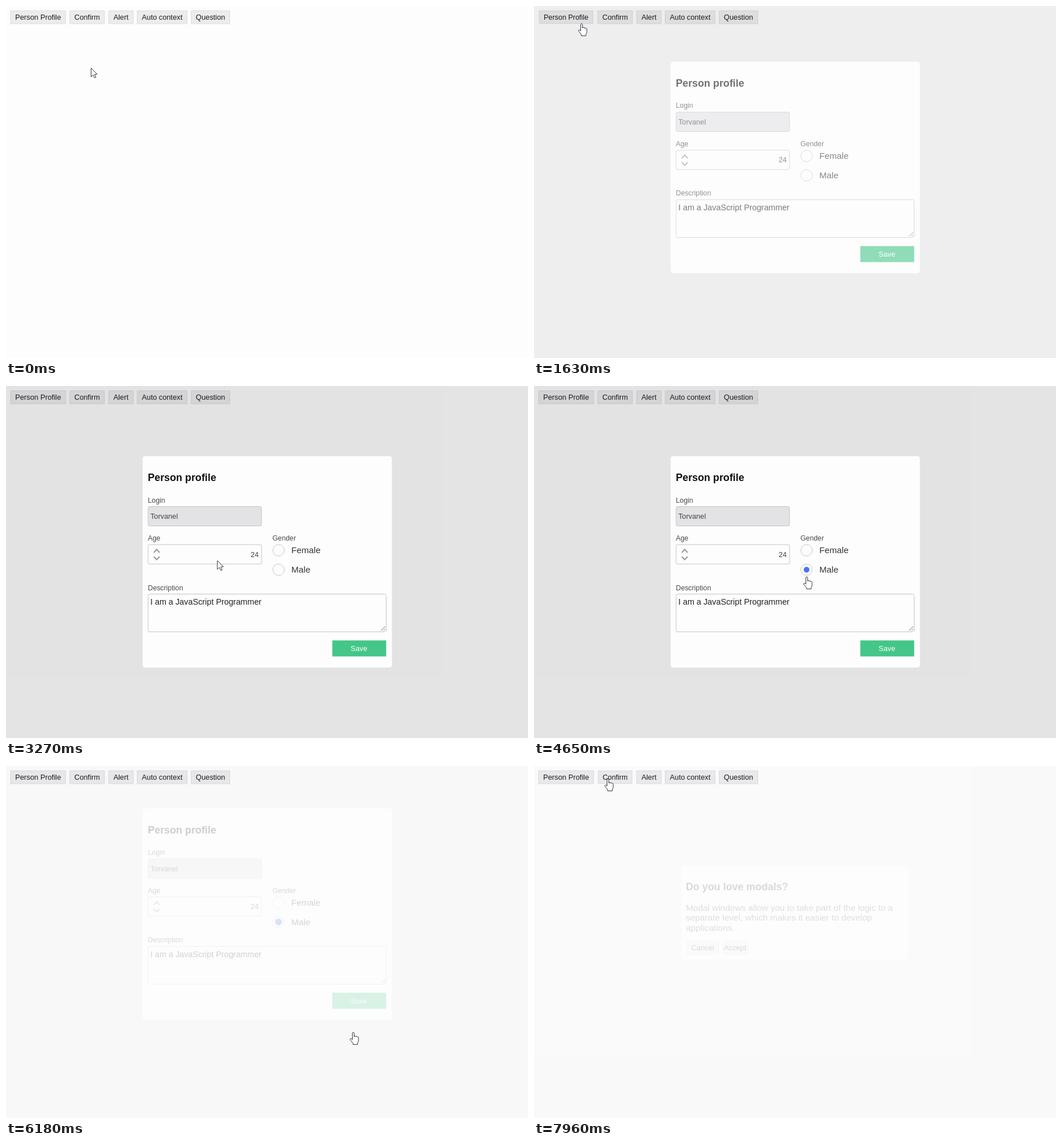
Write an HTML page that moves like this. It is 911 px wide and 615 px high and loops after 7.99 s.

```html
<!DOCTYPE html>
<html lang="en">
<head>
<meta charset="utf-8">
<title>Modal windows</title>
<style>
  html, body { margin: 0; width: 100%; height: 100%; overflow: hidden; background: #fdfdfd; }
  svg { display: block; width: 911px; height: 615px; font-family: "Liberation Sans", Arial, sans-serif; cursor: default; }
  .btn { transform-box: fill-box; transform-origin: center; }
  .btn rect { fill: #ececef; stroke: #dcdce1; }
  .btn text { font-size: 12.75px; text-anchor: middle; fill: #1c1c1c; }
  #save rect { fill: #44c689; stroke: none; }
  #save text { fill: #fff; }
  .shade { fill: #000; fill-opacity: .1; }
  .card { fill: #fdfdfd; }
  .title { font-size: 17.75px; font-weight: bold; fill: #111; }
  .label { font-size: 12.3px; fill: #484848; }
  .value { font-size: 12.7px; fill: #444; }
  .big { font-size: 15.3px; fill: #333; }
  .field { fill: #fdfdfd; stroke: #c4c4cb; }
  .off { fill: #e3e3e6; }
  .ring { fill: #fdfdfd; stroke: #c6c6d2; }
  .dot { fill: #4a74f0; }
  .line { fill: none; stroke: #999; stroke-width: 2; }
  .cursor { fill: #fff; stroke: #33333c; stroke-linejoin: round; }
</style>
</head>
<body>
<svg viewBox="0 0 911 615">
  <g id="bar"></g>

  <g id="profile">
    <rect class="shade" width="911" height="615"/>
    <g class="panel">
      <rect class="card" x="238.5" y="122.5" width="435" height="369.5" rx="4.5"/>
      <text class="title" x="247.5" y="166">Person profile</text>
      <text class="label" x="247.5" y="203.5">Login</text>
      <rect class="field off" x="248" y="210.5" width="198" height="34" rx="3"/>
      <text class="value" x="252" y="232">Torvanel</text>
      <text class="label" x="247.5" y="270">Age</text>
      <rect class="field" x="248" y="277" width="198" height="34" rx="3"/>
      <path class="line" d="M258 291l5-5.5 5 5.5M258 298l5 5.5 5-5.5"/>
      <text class="value" x="441" y="298.5" text-anchor="end">24</text>
      <text class="label" x="465" y="270">Gender</text>
      <circle class="ring" cx="475.7" cy="287" r="10"/>
      <circle class="ring" cx="475.7" cy="321" r="10"/>
      <circle class="dot" id="female" cx="475.7" cy="287" r="5"/>
      <circle class="dot" id="male" cx="475.7" cy="321" r="5"/>
      <text class="big" x="498" y="292">Female</text>
      <text class="big" x="498" y="326">Male</text>
      <text class="label" x="247.5" y="356.5">Description</text>
      <rect class="field" x="248" y="363.5" width="415.5" height="66" rx="3"/>
      <text x="252" y="382" font-size="14.3" fill="#222">I am a JavaScript Programmer</text>
      <path d="M654.5 427.5l7.5-7.5M659 427.5l3-3" stroke="#777" fill="none"/>
      <g class="btn" id="save">
        <rect x="569.5" y="444.5" width="94" height="28"/>
        <text x="616" y="463">Save</text>
      </g>
    </g>
  </g>

  <g id="question">
    <rect class="shade" width="911" height="615"/>
    <g class="panel">
      <rect class="card" x="257" y="225" width="396" height="165" rx="4.5"/>
      <text class="title" x="265" y="268">Do you love modals?</text>
      <text class="big" x="265" y="304">Modal windows allow you to take part of the logic to a</text>
      <text class="big" x="265" y="321.5">separate level, which makes it easier to develop</text>
      <text class="big" x="265" y="339">applications.</text>
      <g class="btn"><rect x="266.5" y="357.5" width="56" height="23"/><text x="294.5" y="373.5">Cancel</text></g>
      <g class="btn"><rect x="329" y="357.5" width="45" height="23"/><text x="351" y="373.5">Accept</text></g>
    </g>
  </g>

  <path class="cursor" id="arrow" d="M.5.5v15.2l3.6-3.3 2.4 5.2 2.4-1-2.3-5.1 4.4-.3z"/>
  <path class="cursor" id="hand" d="M-1.5 13V1.8Q-1.3.4 0 .4T1.6 1.8V8q.2-1.4 1.5-1.3T4.6 8.2q.3-1 1.4-.8t1.4 1.4q.3-.8 1.1-.4T9.2 10v5q0 2-1.6 4v2.5h-8V19.4L-5.3 13.2q-.5-1.5.8-1.9t3 1.7z"/>
</svg>
<script>
const LOOP = 7990, RISE = 60;
const $ = id => document.getElementById(id);

const buttons = [
  ["Person Profile", 8, 96], ["Confirm", 111.3, 60.5], ["Alert", 179.2, 42.8],
  ["Auto context", 229, 87], ["Question", 323.2, 67.3]
];
$("bar").innerHTML = buttons.map(([name, x, w]) =>
  `<g class="btn"><rect x="${x}" y="8.3" width="${w}" height="22.7"/>` +
  `<text x="${x + w / 2}" y="24">${name}</text></g>`).join("");
const [openProfile, openConfirm] = $("bar").children;

// pointer stops: time, x, y, and 1 where the move eases in and out
const path = [
  [0, 148, 108], [590, 148, 108], [1100, 83, 30.5, 1], [2540, 83, 30.5],
  [3330, 373, 309, 1], [3580, 440, 240], [3740, 482, 277], [3820, 477, 286],
  [4020, 476, 321, 1], [4480, 476, 321], [4650, 476, 333], [4930, 478, 361],
  [5260, 478, 361], [5530, 606, 465, 1], [6300, 606, 465], [6630, 314, 336],
  [6830, 255, 310], [7100, 150, 120], [7250, 108, 40], [7420, 166, 23],
  [7520, 166, 23], [7640, 129, 22, 1], [LOOP, 129, 22]
];
const handTimes = [[1050, 2580], [3730, 4770], [5500, 6330], [7290, LOOP]];

const clamp = v => Math.min(1, Math.max(0, v));
const within = (t, a, b) => t >= a && t < b;
const show = (el, on) => el.style.display = on ? "" : "none";

// CSS "ease": cubic-bezier(.25, .1, .25, 1)
function ease(x) {
  if (x <= 0 || x >= 1) return clamp(x);
  let lo = 0, hi = 1, u = .5;
  for (let i = 0; i < 20; i++) {
    u = (lo + hi) / 2;
    const bx = .75 * u * (1 - u) + u ** 3;
    if (bx < x) lo = u; else hi = u;
  }
  return .3 * u * (1 - u) ** 2 + 3 * u * u * (1 - u) + u ** 3;
}

function setModal(id, amount) {
  const el = $(id);
  show(el, amount > 0);
  el.style.opacity = amount;
  el.querySelector(".panel").setAttribute("transform", `translate(0 ${-RISE * (1 - amount)})`);
}

function press(el, on) {
  el.style.transform = on ? "scale(.975)" : "none";
}

function setPointer(t) {
  const i = path.findIndex(p => p[0] > t);
  const [t0, x0, y0] = path[i - 1], [t1, x1, y1, soft] = path[i];
  let k = (t - t0) / (t1 - t0);
  if (soft) k = k * k * (3 - 2 * k);
  const at = `translate(${x0 + (x1 - x0) * k} ${y0 + (y1 - y0) * k})`;
  const hand = handTimes.some(([a, b]) => within(t, a, b));
  show($("hand"), hand);
  show($("arrow"), !hand);
  $("hand").setAttribute("transform", at);
  $("arrow").setAttribute("transform", at);
}

function draw(t) {
  setModal("profile", ease((t - 1540) / 270) * (1 - ease((t - 6060) / 240)));
  setModal("question", t < 7930 ? 0 : ease((Math.min(t, 7960) - 7925) / 270));
  press(openProfile, within(t, 1550, 1640));
  press(openConfirm, t >= 7920);
  press($("save"), within(t, 5860, 6130));
  show($("female"), within(t, 3800, 4330));
  show($("male"), t >= 4330);
  $("male").setAttribute("r", t < 4770 ? 5 : 6);
  setPointer(t);
}

const start = performance.now();
function tick() {
  draw((performance.now() - start) % LOOP);
  requestAnimationFrame(tick);
}
tick();
</script>
</body>
</html>
```
